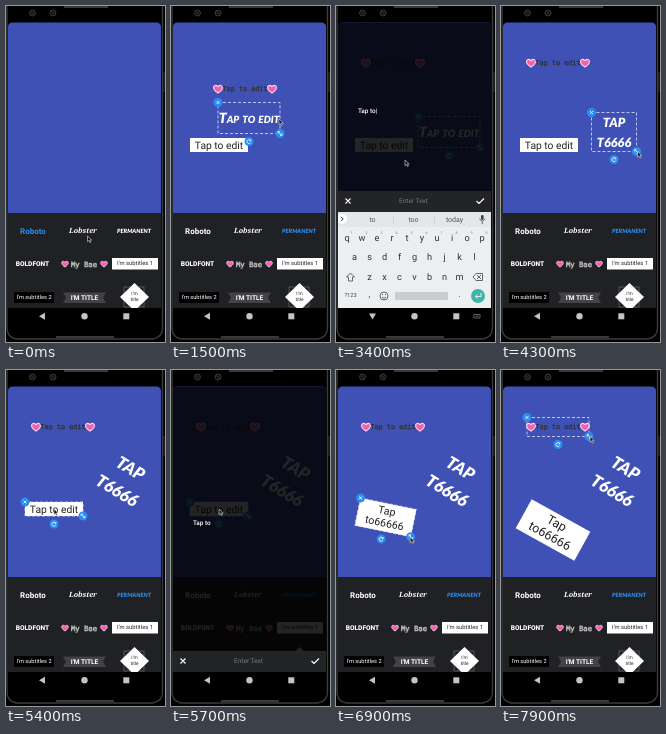
Write an HTML page that moves like this. It is 159x336 px and loops after 8000 ms.

```html
<!DOCTYPE html>
<html lang="en">
<head>
<meta charset="utf-8">
<title>Sticker text editor</title>
<style>
html, body { margin: 0; width: 100%; height: 100%; overflow: hidden; background: #000; }
svg { display: block; width: 100%; height: 100%; }
text { font-family: Roboto, sans-serif; text-anchor: middle; dominant-baseline: central; text-rendering: geometricPrecision; white-space: pre; }
.marker { font-family: Lato, sans-serif; font-weight: 900; font-style: italic; font-variant: small-caps; }
.script { font-family: "Noto Serif", serif; font-weight: 800; font-style: italic; }
.bae { font-family: "DejaVu Sans Mono", monospace; }
.left { text-anchor: start; font-weight: 500; }
.line { fill: none; stroke: #444; stroke-width: .8; }
</style>
</head>
<body>
<svg viewBox="0 0 159 336" preserveAspectRatio="none">
  <defs>
    <clipPath id="screen"><path d="M2 302V21Q2 16.500 7 16.500H150Q155 16.500 155 21V302Z"/></clipPath>
    <path id="heart" d="M0 4C-7.500-.6-4-6 0-2.400C4-6 7.500-.6 0 4Z" fill="#f45fae" stroke="#ffd9ec" stroke-width="1.100"/>
  </defs>
  <rect width="159" height="336" fill="#000"/>
  <path d="M1 0V322Q1 331 10 333H147Q156.500 331 156.500 322V0" fill="none" stroke="#3c3c3e" stroke-width="1.400"/>
  <path d="M58 1H102M50 331H108" stroke="#39393b" stroke-width="2"/>
  <path d="M158 66V86" stroke="#333"/>
  <g fill="#111" stroke="#454547" stroke-width=".8">
    <circle cx="26.5" cy="7" r="3"/><circle cx="47" cy="7" r="3"/>
    <path d="M25 5.500L28 8.500M45.500 5.500L48.500 8.500"/>
  </g>
  <g clip-path="url(#screen)">
    <rect x="2" y="16" width="153" height="191" fill="#3f51b5"/>
    <rect x="2" y="207" width="153" height="95" fill="#202125"/>
    <g id="panel"></g>
    <g id="stickers"></g>
    <g id="dialog"></g>
  </g>
  <g id="nav"></g>
  <path id="pointer" d="M0 0V5.600L1.400 4.400L2.400 6.600L3.400 6.100L2.400 4H4.200Z" fill="#111" stroke="#ddd" stroke-width=".6"/>
</svg>
<script>
const LOOP = 8000, STEP = 100, BLUE = '#2b8df0';
const CENTER = [78, 112], CHECK = [148, 199], REST = [69, 154];
const SMALL = .75; // scale of freshly edited text

const el = id => document.getElementById(id);
const put = (id, markup) => { el(id).innerHTML = markup; };
const mix = (a, b, p) => a + (b - a) * p;
const progress = (t, from, to) => Math.max(0, Math.min(1, (t - from) / (to - from)));
const plus = (a, b) => [a[0] + b[0], a[1] + b[1]];
const cell = (col, row) => [27 + 50.5 * col, 225 + 33 * row];

const text = (s, x, y, size, fill = '#fff', extra = '') =>
  `<text x="${x}" y="${y}" font-size="${size}" fill="${fill}" ${extra}>${s}</text>`;
const rect = (x, y, w, h, fill, extra = '') =>
  `<rect x="${x}" y="${y}" width="${w}" height="${h}" fill="${fill}" ${extra}/>`;
const heart = (x, y, s = 1) => `<use href="#heart" transform="translate(${x} ${y}) scale(${s})"/>`;
const line = (d, extra = '') => `<path class="line" d="${d}" ${extra}/>`;

// The user's session; stickers, selection, dialog and pointer all follow from it.
const add = (at, on, tap) => ({ at, on, tap });
const drag = (at, on, to, grip = [0, 0]) => ({ at, on, to, grip, end: at + 300 });
const turn = (at, on, to, angle) => ({ at, on, to, angle, end: at + 500 });
const edit = (at, on, digits, close) => ({ at, on, digits, close, open: at + 200 });
const grab = (at, on) => ({ at, on, end: at + 400 });
const ACTIONS = [
  add(300, 'subtitle', cell(2, 1)), drag(400, 'subtitle', [48, 139]),
  add(800, 'hearts', cell(1, 1)), drag(900, 'hearts', [74, 83]),
  add(1400, 'marker', cell(2, 0)), drag(1500, 'marker', [113, 126], [30, 1]),
  drag(1900, 'hearts', [57, 57]),
  edit(2300, 'marker', 4, 4000), turn(4300, 'marker', [118, 109], 31),
  edit(5300, 'subtitle', 5, 6400), turn(6700, 'subtitle', [52, 160], 29),
  grab(7500, 'hearts'),
];

const STICKERS = {
  subtitle: {
    size: [58, 14], editedSize: [67, 33],
    body: (edited, [w, h]) => rect(-w / 2, -h / 2, w, h, '#fff') + (edited
      ? text('Tap', 0, -7, 12.5, '#222') + text('to66666', 0, 7.5, 12.5, '#222')
      : text('Tap to edit', 0, .5, 10.3, '#222')),
  },
  hearts: {
    size: [62, 19],
    body: () => heart(-27, 0) + heart(27, 0) +
      text('Tap to edit', 0, -.5, 6.8, '#333', 'class="bae" stroke="#333" stroke-width=".3"'),
  },
  marker: {
    size: [62, 31], editedSize: [60, 52],
    body: edited => edited
      ? text('TAP', 0, -13, 17, '#fff', 'class="marker"') + text('T6666', 0, 13, 17, '#fff', 'class="marker"')
      : text('Tap to edit', 0, 0, 14.2, '#fff', 'class="marker"'),
  },
};

function poseOf(name, t) {
  const pose = { at: CENTER, angle: 0, scale: 1, edited: false };
  for (const a of ACTIONS.filter(a => a.on === name && a.at <= t)) {
    if (a.close && t > a.close) Object.assign(pose, { edited: true, scale: SMALL });
    if (!a.to) continue;
    const p = progress(t, a.at, a.end);
    pose.at = pose.at.map((v, i) => mix(v, a.to[i], p));
    if (a.angle) Object.assign(pose, { angle: a.angle * p, scale: mix(SMALL, 1, p) });
  }
  const { size, editedSize } = STICKERS[name];
  pose.size = pose.edited ? editedSize : size;
  return pose;
}

function cornerOf(name, t) {
  const { at, angle, scale, size } = poseOf(name, t);
  const [x, y] = size.map(v => v / 2 * scale), r = angle * Math.PI / 180;
  return plus(at, [x * Math.cos(r) - y * Math.sin(r) + 1, x * Math.sin(r) + y * Math.cos(r)]);
}

function stopsOf(a) {
  const here = poseOf(a.on, a.at).at;
  if (a.tap) return [[a.at, a.tap]];
  if (a.close) return [[a.at, here], [a.open + 400, here], [mix(a.open, a.close, .6), REST], [a.close, CHECK]];
  if (a.angle) return [[a.at, cornerOf(a.on, a.at)], [a.end, cornerOf(a.on, a.end)]];
  if (a.to) return [[a.at, plus(here, a.grip)], [a.end, plus(a.to, a.grip)]];
  return [[a.at, here], [a.end, cornerOf(a.on, a.end)]];
}
const STOPS = [[0, plus(cell(1, 0), [4, 5])], ...ACTIONS.flatMap(stopsOf)];

function pointerAt(t) {
  const next = STOPS.findIndex(s => s[0] > t);
  if (next < 0) return STOPS.at(-1)[1];
  const [from, a] = STOPS[next - 1], [to, b] = STOPS[next], p = progress(t, from, to);
  return [mix(a[0], b[0], p), mix(a[1], b[1], p)];
}

function panel(style) {
  const ink = (name, base = '#fff') => style === name ? BLUE : base;
  put('panel',
    text('Roboto', 27, 225, 8, ink('roboto'), 'font-weight="700"') +
    text('Lobster', 77, 224.5, 7.2, '#fff', 'class="script"') +
    text('PERMANENT', 128, 225, 5.8, ink('marker'), 'class="marker"') +
    text('BOLDFONT', 26.5, 258, 6.6, '#fff', 'font-weight="900"') +
    heart(59, 258, .75) + heart(98, 258, .75) +
    text('My Bae', 78, 258, 7.2, '#202125',
      `class="bae" stroke="${ink('hearts', '#bbb')}" stroke-width=".6"`) +
    rect(106, 252, 46, 11.5, '#fff') + text("I'm subtitles 1", 129, 258, 5.8, ink('subtitle', '#222')) +
    rect(8, 286, 40, 11, '#000') + text("I'm subtitles 2", 28, 291.5, 5.7) +
    '<path d="M57 286.500H100L97 291.500L100 297H57L60 291.500Z" fill="#434347"/>' +
    text("I'M TITLE", 78.5, 291.7, 6.6, '#fff', 'font-weight="700"') +
    rect(118, 281, 20, 20, 'none', 'stroke="#77787c" stroke-width=".6"') +
    '<path d="M128.500 277L143 291L128.500 305L114 291Z" fill="#fff"/>' +
    text("I'm", 128.5, 288, 4.8, '#222') + text('title', 128.5, 294, 4.8, '#222'));
}

function handles(w, h) {
  const knob = (x, y, d) => `<g transform="translate(${x} ${y})"><circle r="4.500" fill="${BLUE}"/>
    <path d="${d}" fill="none" stroke="#fff" stroke-width=".8"/></g>`;
  return rect(-w / 2, -h / 2, w, h, 'none', 'stroke="#dfe3ff" stroke-width=".8" stroke-dasharray="3 2"') +
    knob(-w / 2, -h / 2, 'M-1.500-1.500L1.500 1.500M1.500-1.500L-1.500 1.500') +
    knob(w / 2, h / 2, 'M-1.800-1.800L1.800 1.800M-1.800 0V-1.800H0M1.800 0V1.800H0') +
    knob(0, h / 2 + 8, 'M1.600-1A2 2 0 1 0 1.800 1M1.800-2V-.6H.4');
}

function sticker(name, t, selected) {
  const { at, angle, scale, size, edited } = poseOf(name, t);
  return `<g transform="translate(${at}) rotate(${angle})">
    <g transform="scale(${scale})">${STICKERS[name].body(edited, size)}</g>
    ${selected ? handles(...size.map(v => v * scale)) : ''}</g>`;
}

function stickers(t) {
  const selected = ACTIONS.findLast(a => a.at <= t)?.on;
  const added = ACTIONS.filter(a => a.tap && a.at < t);
  put('stickers', added.map(a => sticker(a.on, t, a.on === selected)).join(''));
}

function keyboard(words) {
  const row = (letters, x, y) => [...letters].map((c, i) => text(c, x + 15 * i, y, 9.2, '#333')).join('');
  const hints = [...'1234567890'].map((c, i) => text(c, 15.5 + 15 * i, 227, 3.6, '#777')).join('');
  return rect(2, 206, 153, 96, '#eceff1') + rect(2, 206, 153, 15, '#e4e7e9') +
    '<circle cx="6" cy="213" r="5" fill="#fff"/>' +
    line('M5 210.800L7.200 213L5 215.200', 'style="stroke:#333;stroke-width:1"') +
    words.map((w, i) => text(w, 36.5 + 41 * i, 213.5, 7, '#555')).join('') +
    (words.length ? line('M57.500 210V217M98.500 210V217', 'style="stroke:#ccc"') : '') +
    rect(145, 209, 2.6, 5, '#444', 'rx="1.300"') + line('M143.600 212.500Q146.300 218 149 212.500M146.300 215.500V218') +
    row('qwertyuiop', 11, 232) + hints + row('asdfghjkl', 18.5, 251) + row('zxcvbnm', 33.5, 271) +
    line('M10.500 271L14.500 267L18.500 271H16.500V275H12.500V271Z') +
    line('M137 271L140 267.500H146.500V274.500H140ZM141 269L145 273M145 269L141 273') +
    text('?123', 14.5, 290, 5.6, '#444') + text(',', 33.5, 289, 9, '#444') +
    '<circle class="line" cx="48" cy="290" r="4"/>' + line('M46 291Q48 294 50 291M46.500 288V289M49.500 288V289') +
    rect(59, 286, 53, 8, '#c9cdd1', 'rx="1"') + text('.', 123.5, 289, 9, '#444') +
    '<circle cx="142" cy="290" r="7" fill="#42b3a8"/>' +
    line('M145 287V290.500H139.500M141.500 288.500L139.500 290.500L141.500 292.500', 'style="stroke:#fff"');
}

function typed(t, { digits, close }) {
  const left = Math.ceil((close - t) / STEP);
  if (left > digits + 2) return 'Tap to edit';
  return 'Tap to' + '6'.repeat(Math.max(0, Math.min(digits, digits - left)));
}

// Draws the text dialog and tells whether the keyboard is showing.
function dialog(t) {
  const open = ACTIONS.find(a => a.close && t >= a.open && t < a.close + 300);
  if (!open) { put('dialog', ''); return false; }
  const up = t > open.close ? 0 : progress(t, open.open + 200, open.open + 400);
  const slide = 57 * (1 - progress(t, open.open, open.open + 100)) +
    285 * progress(t, open.close, open.close + 300) ** 2;
  const value = typed(t, open), bar = 281 - 96 * up;
  const words = value.endsWith('6') ? [] : ['to', 'too', 'today'];
  put('dialog', `<g transform="translate(0 ${slide})">` +
    rect(2, 16, 153, 290, '#000', 'opacity=".86"') +
    text(value + (up === 1 ? '|' : ''), 22, 153 - 48 * up, 6.4, '#fff', 'class="left"') +
    rect(2, bar, 153, 21, '#232428') +
    `<g transform="translate(0 ${bar + 10})">` +
    line('M9.500-2.500L14.500 2.500M14.500-2.500L9.500 2.500M140.500 0L143 2.500L148-2.500', 'style="stroke:#fff;stroke-width:1.1"') +
    text('Enter Text', 77.5, 0, 6.5, '#77797e') + '</g>' +
    (up ? `<g transform="translate(0 ${96 * (1 - up)})">${keyboard(words)}</g>` : '') + '</g>');
  return up > 0;
}

function nav(typing) {
  const back = typing ? 'M33 307.500H40L36.500 313.500Z' : 'M39 306.800V313.800L33 310.300Z';
  put('nav', `<g fill="#c4c4c4"><path d="${back}"/><circle cx="78.500" cy="310.300" r="3.200"/>
    <rect x="117.300" y="307.300" width="6" height="6"/></g>` +
    (typing ? line('M138 308.500H144V312H138ZM139.500 310.200H142.500', 'style="stroke:#777"') : ''));
}

function render(t) {
  panel(ACTIONS.findLast(a => a.tap && a.at <= t)?.on ?? 'roboto');
  stickers(t);
  nav(dialog(t));
  el('pointer').setAttribute('transform', `translate(${pointerAt(t)})`);
}

const start = performance.now();
let shown = -1;
function tick() {
  const t = Math.floor(((performance.now() - start) % LOOP) / STEP) * STEP;
  if (t !== shown) render(shown = t);
  requestAnimationFrame(tick);
}
tick();
</script>
</body>
</html>
```
